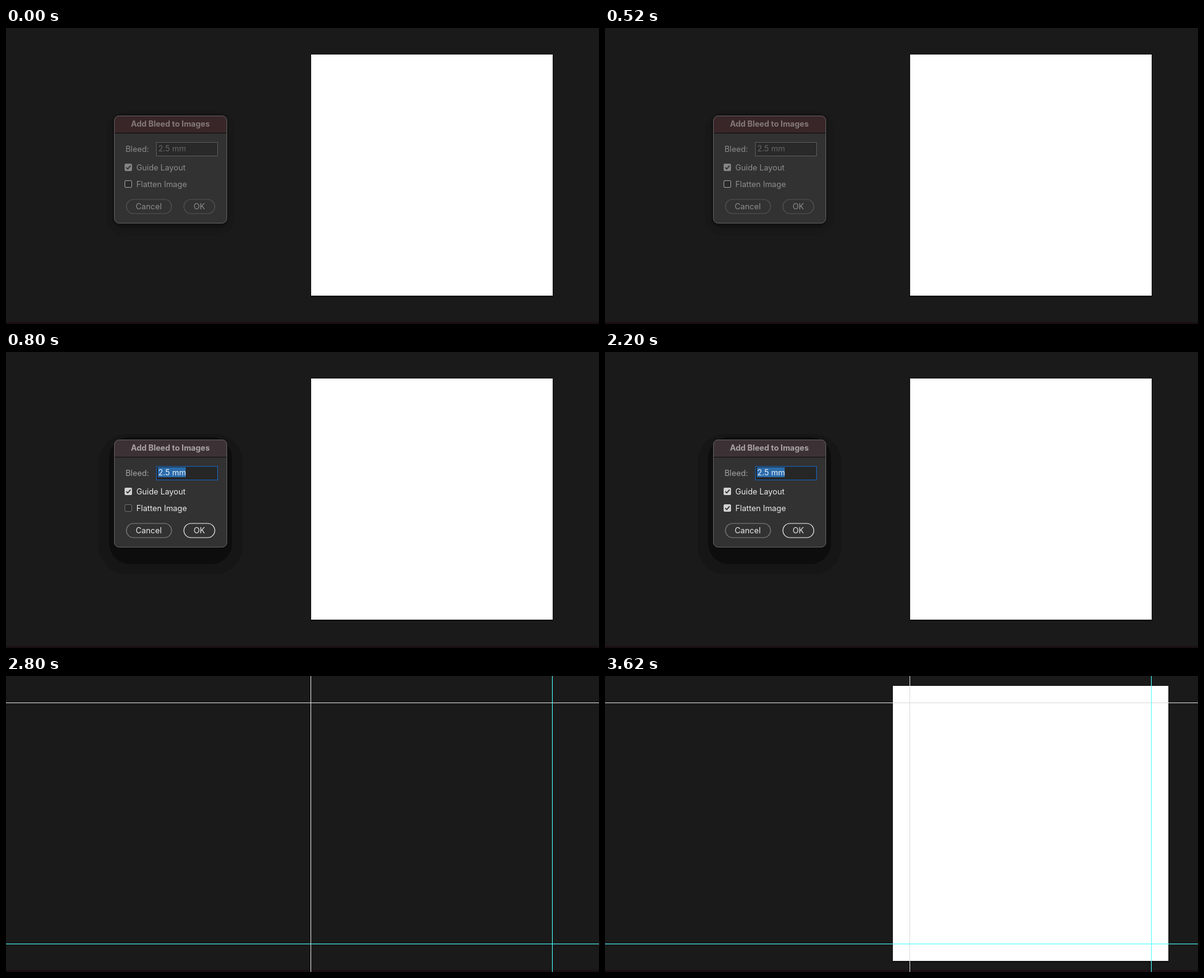
An HTML page with a canvas for the animation above (4100 ms loop, 960 px wide and 480 px high).

```html
<!DOCTYPE html>
<html lang="en">
<head>
<meta charset="utf-8">
<title>Add Bleed to Images</title>
<style>
html, body { margin: 0; width: 100%; height: 100%; overflow: hidden; background: #1a1a1a; }
canvas { display: block; }
</style>
</head>
<body>
<canvas id="stage" width="960" height="480"></canvas>
<script>
const ctx = document.getElementById('stage').getContext('2d');
const LOOP = 4100, FOCUS = 800, FLATTEN = 1300, GUIDES = 2800, RESULT = 2900;
const FONT = 'Inter, "Liberation Sans", sans-serif';

const DIM = {
  head: '#382628', title: '#85797a', text: '#8d8d8d', label: '#8a8a8a', value: '#666666',
  field: '#5b5b5b', fieldFill: '#292929', cancel: '#555555', ok: '#555555',
  check: '#858585', empty: '#a2a2a2',
  shadows: [[163, 135, 207, 202, 30, '#181818'], [172, 139, 188, 185, 16, '#131313']]
};
const LIT = {
  head: '#3c3235', title: '#aaa4a5', text: '#eaeaea', label: '#a3a3a3', value: '#e8f0f8',
  field: '#1565c0', fieldFill: '#262626', cancel: '#808080', ok: '#ececec',
  check: '#d2d2d2', empty: '#6c6c6c',
  shadows: [[150, 133, 233, 228, 46, '#161616'], [167, 138, 199, 206, 34, '#0d0d0d']]
};

function rect(x, y, w, h, color) {
  ctx.fillStyle = color;
  ctx.fillRect(x, y, w, h);
}

function round(x, y, w, h, r, fill, stroke, width = 1) {
  ctx.beginPath();
  ctx.roundRect(x, y, w, h, r);
  if (fill) { ctx.fillStyle = fill; ctx.fill(); }
  if (stroke) { ctx.strokeStyle = stroke; ctx.lineWidth = width; ctx.stroke(); }
}

function text(str, x, y, color, align = 'left', weight = 400, size = 12.8) {
  ctx.font = `${weight} ${size}px ${FONT}`;
  ctx.textAlign = align;
  ctx.fillStyle = color;
  ctx.fillText(str, x, y);
}

function checkbox(y, on, s) {
  if (!on) return round(192.5, y + .5, 11, 11, 1.5, '#2a2a2a', s.empty);
  round(192, y, 12, 12, 2, s.check);
  ctx.beginPath();
  ctx.moveTo(194.7, y + 6.2);
  ctx.lineTo(197.1, y + 8.6);
  ctx.lineTo(201.6, y + 3.4);
  ctx.strokeStyle = '#303030';
  ctx.lineWidth = 1.7;
  ctx.stroke();
}

function dialog(t) {
  const lit = t >= FOCUS, s = lit ? LIT : DIM;
  for (const shadow of s.shadows) round(...shadow);
  round(174.5, 141.5, 184, 176, 9, '#090909');

  round(175, 142, 183, 175, 8.5, '#323232');
  round(175, 142, 183, 28, [8.5, 8.5, 0, 0], s.head);
  rect(175, 170, 183, 1, '#0c0c0c');
  round(175.5, 142.5, 182, 174, 8, null, '#646262');
  text('Add Bleed to Images', 266, 160, s.title, 'center', 700);

  text('Bleed:', 193.5, 201, s.label);
  rect(243, 185, 100, 23, s.field);
  rect(244, 186, 98, 21, s.fieldFill);
  if (lit) rect(246, 187, 45, 16, '#2b6cab');
  text('2.5 mm', 246.5, 200, s.value);

  checkbox(220, true, s);
  text('Guide Layout', 211, 231, s.text);
  checkbox(247, t >= FLATTEN, s);
  text('Flatten Image', 211, 258, s.text);

  round(195, 278, 73, 23, 11.5, null, s.cancel, 1.2);
  text('Cancel', 231, 294, s.text, 'center');
  round(288, 278, 50, 23, 11.5, null, s.ok, 1.2);
  text('OK', 313, 294, s.text, 'center');
}

function page(x, y, size) {
  rect(x - 1, y - 1, size + 2, size + 4, '#141414');
  rect(x, y, size, size, '#ffffff');
}

function guides() {
  rect(0, 43, 960, 1, '#dcdcdc');
  rect(493, 0, 1, 480, '#dcdcdc');
  rect(0, 434, 960, 1, '#4affff');
  rect(884, 0, 1, 480, '#4affff');
}

function draw(t) {
  rect(0, 0, 960, 480, '#1a1a1a');
  rect(0, 477, 960, 3, '#190f13');
  if (t < GUIDES) {
    page(494, 43, 391);
    dialog(t);
  } else {
    if (t >= RESULT) page(466, 16, 446);
    guides();
  }
}

const start = performance.now();
function tick() {
  draw((performance.now() - start) % LOOP);
  requestAnimationFrame(tick);
}
tick();
</script>
</body>
</html>
```
